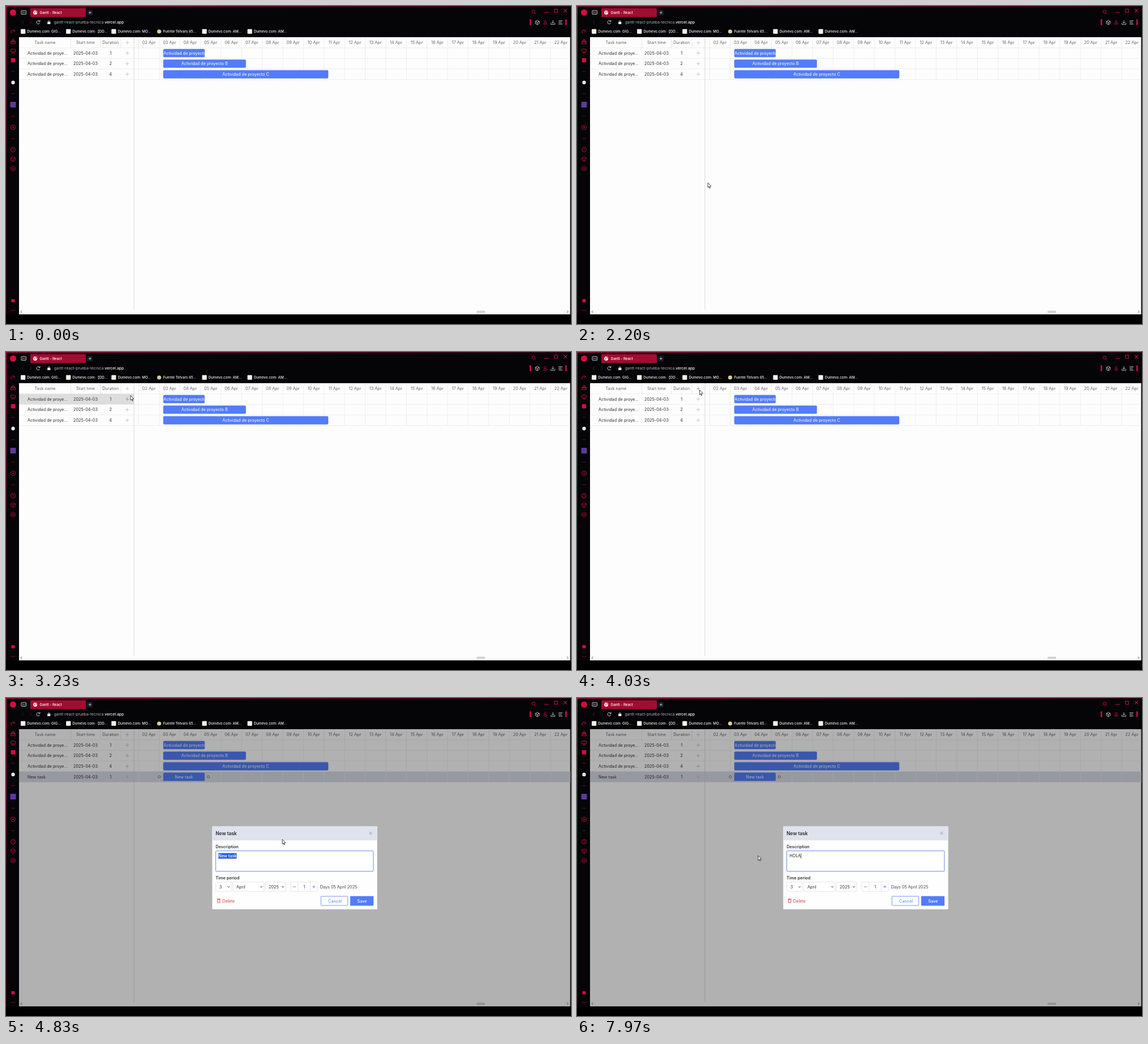
Recreate the animation shown at these times as an HTML page with a canvas. Size 998x561 px, loop 8 s.

```html
<!DOCTYPE html>
<html lang="es">
<head>
<meta charset="utf-8">
<title>Gantt</title>
<style>
  html, body { margin: 0; width: 100%; height: 100%; overflow: hidden; background: #000; }
  canvas { display: block; width: 998px; height: 561px; }
</style>
</head>
<body>
<canvas id="stage" width="998" height="561"></canvas>
<script>
const ctx = document.getElementById('stage').getContext('2d');
const FONT = 'Inter, "Noto Sans CJK JP", "Noto Sans CJK SC", sans-serif';
const LOOP = 8000, CLICK = 4050, DAY = 36.38, ROW = 18.65;
const RED = '#d20f3e', BLUE = '#537cfa', INK = '#303134';
const KEYS = [6600, 6950, 7250, 7500], TYPED = 'HOLA';

// Pointer path: time, x, y
const PATH = [
  [1900, 234, 522], [2250, 231, 300], [2580, 229, 108], [2670, 224.5, 88],
  [3050, 222, 82], [3500, 216.5, 67], [4300, 216.5, 67], [4850, 489, 250],
  [5170, 468, 256], [5800, 320, 278], [LOOP, 320, 278]
];

const rowY = i => 83.1 + i * ROW;

function rect(x, y, w, h, fill, r = 0, stroke, lw = 0.6) {
  ctx.beginPath();
  ctx.roundRect(x, y, w, h, r);
  if (fill) { ctx.fillStyle = fill; ctx.fill(); }
  if (stroke) { ctx.strokeStyle = stroke; ctx.lineWidth = lw; ctx.stroke(); }
}

function line(points, color, lw = 0.8) {
  ctx.beginPath();
  for (let i = 0; i < points.length; i += 2) ctx.lineTo(points[i], points[i + 1]);
  ctx.strokeStyle = color;
  ctx.lineWidth = lw;
  ctx.stroke();
}

function ring(x, y, r, color, lw = 0.9, from = 0, to = Math.PI * 2) {
  ctx.beginPath();
  ctx.arc(x, y, r, from, to);
  ctx.strokeStyle = color;
  ctx.lineWidth = lw;
  ctx.stroke();
}

function dot(x, y, r, color) {
  ctx.beginPath();
  ctx.arc(x, y, r, 0, Math.PI * 2);
  ctx.fillStyle = color;
  ctx.fill();
}

// y is the middle of the capitals; returns the right edge of left-aligned text
function text(str, x, y, color, size = 7.28, weight = 400, align = 'left') {
  ctx.font = `${weight} ${size}px ${FONT}`;
  ctx.textAlign = align;
  ctx.fillStyle = color;
  ctx.fillText(str, x, y + size * 0.36);
  return x + ctx.measureText(str).width;
}

const label = (str, x, y, color, weight) => text(str, x, y, color, 7.28, weight, 'center');

function plus(x, y, r, color, lw = 0.8) {
  line([x - r, y, x + r, y], color, lw);
  line([x, y - r, x, y + r], color, lw);
}

function chevron(x, y) {
  line([x - 2, y - 1, x, y + 1, x + 2, y - 1], '#333', 0.9);
}

function cube(x, y, r, color) {
  const w = r * 0.87, h = r / 2;
  line([x, y - r, x + w, y - h, x + w, y + h, x, y + r, x - w, y + h, x - w, y - h, x, y - r], color);
  line([x - w, y - h, x, y, x + w, y - h], color);
  line([x, y, x, y + r], color);
}

function fade(x, y, w, h, x2, y2) {
  const g = ctx.createLinearGradient(0, 0, x2, y2);
  g.addColorStop(0, '#c80f3a');
  g.addColorStop(1, '#3a0612');
  ctx.fillStyle = g;
  ctx.fillRect(x, y, w, h);
}

function drawSidebar() {
  const x = 12.5;
  ring(x, 46, 3.6, RED, 1, 2.4, 6);
  line([x, 46, x + 3, 43], RED, 1);
  line([x, 58, x, 61], RED, 1.2);
  rect(x - 3, 61, 6, 2, null, 0, RED, 0.9);
  rect(x - 4, 63.5, 8, 3, null, 0, RED, 0.9);
  rect(x - 4, 76, 8, 5, null, 1, RED, 0.9);
  line([x - 2.5, 83, x + 2.5, 83], RED, 0.9);
  rect(x - 3.8, 92, 7.6, 7.6, RED, 1);
  for (const y of [115.2, 154.6, 194.4, 234]) line([x - 3, y, x + 3, y], '#7d1230', 0.8);
  dot(x, 135, 3.2, '#e8e8ee');
  rect(x - 5, 169, 10, 10, '#5b3a9c', 1);
  ring(x, 214, 4, RED);
  dot(x, 214, 1.3, RED);
  ring(x, 253.5, 4, RED);
  line([x, 251, x, 253.7, x + 1.8, 254.7], RED);
  cube(x, 270, 4.3, RED);
  const hex = [];
  for (let i = 0; i <= 6; i++) {
    const a = i * Math.PI / 3 + Math.PI / 6;
    hex.push(x + 4.4 * Math.cos(a), 286.8 + 4.4 * Math.sin(a));
  }
  line(hex, RED);
  ring(x, 286.8, 1.6, RED);
  rect(x - 3, 517.2, 6, 5.4, RED);
  for (const d of [-2.8, 0, 2.8]) dot(x + d, 537, 0.75, RED);
}

function drawBrowser() {
  rect(0, 0, 998, 561, '#050508');
  rect(0, 544, 998, 17, '#000');
  fade(0, 0, 998, 1, 998, 0);
  fade(0, 0, 1, 544, 0, 300);
  dot(12.5, 11.5, 5.5, RED);

  rect(27, 8, 8.4, 6.6, null, 0.6, '#e4e4e8', 0.9);
  line([29, 10, 31, 11.4, 29, 12.8], '#e4e4e8');
  line([33.5, 10, 32.4, 11.4, 33.5, 12.8], '#e4e4e8');
  rect(43, 4, 98, 15.4, '#a10d31', 1.5);
  dot(51.6, 11.6, 3.6, '#fff');
  line([49, 10.2, 51.2, 11.3, 50.6, 13.8], '#a10d31', 1);
  line([52.5, 8.6, 53, 10.6, 54.8, 11.2], '#a10d31', 1);
  text('Gantt - React', 59.5, 11.7, '#fff', 6.24, 500);
  rect(143.5, 7, 9.5, 9.5, '#1b1b27', 1);
  plus(148.3, 11.7, 2.4, '#d8d8de');

  line([31, 25.6, 28, 28.5, 31, 31.4], '#55212f', 0.9);
  line([42.3, 25.6, 45.3, 28.5, 42.3, 31.4], '#55212f', 0.9);
  ring(57, 28.7, 3, '#e0e0e6', 0.9, 0.4, 5.5);
  line([60, 25, 60, 27.4, 57.6, 27.4], '#e0e0e6', 0.9);
  rect(73.2, 28, 5.2, 4, '#eee', 0.6);
  ring(75.8, 27.8, 1.6, '#eee', 0.9, Math.PI, 0);
  const host = text('gantt-react-prueba-tecnica.', 84.7, 28.8, '#b4b4bc', 6.76);
  text('vercel.app', host, 28.8, '#fff', 6.76, 500);

  ring(931.8, 9.8, 2.7, RED);
  line([933.8, 11.8, 936.4, 14.2], RED);
  line([950.5, 11.2, 959, 11.2], RED, 0.9);
  rect(968.7, 5.6, 5.6, 5.6, null, 0, RED, 1);
  line([985.2, 5.4, 991, 11.2], RED, 1.1);
  line([991, 5.4, 985.2, 11.2], RED, 1.1);

  rect(925, 23.5, 2.6, 10.2, RED);
  rect(988, 23.5, 2.4, 10.2, RED);
  cube(938.5, 29, 3.8, '#e4e4e8');
  ring(952.3, 27.2, 1.7, '#b00f36');
  rect(949.3, 30, 6, 2.2, null, 0.8, '#b00f36', 0.9);
  line([966, 25.2, 966, 30.3], '#e4e4e8');
  line([963.8, 28.2, 966, 30.4, 968.2, 28.2], '#e4e4e8');
  line([962.5, 30, 962.5, 32.4, 969.5, 32.4, 969.5, 30], '#e4e4e8');
  [0, 2.8, 5.6].forEach((d, i) =>
    line([976, 26.2 + d, 983 - (i === 1 ? 1.5 : 0), 26.2 + d], '#e4e4e8', 0.9));

  const marks = ['Dumevo.com: GIG...', 'Dumevo.com:【DD...', 'Dumevo.com: MO...',
    'Fuente Telvars 65...', 'Dumevo.com: AM...', 'Dumevo.com: AM...'];
  marks.forEach((name, i) => {
    const x = 26 + i * 80.1;
    if (i === 3) dot(x + 4.2, 45, 3.6, '#dccb9a');
    else rect(x, 40.8, 8.2, 8.2, '#f4f1e8', 1);
    text(name, x + 11.2, 45, '#f2f2f4', 6.24, 500);
  });
  drawSidebar();
}

function drawBar(i, days, name) {
  const y = rowY(i) - 7, w = days * DAY;
  rect(278, y, w, 14, BLUE, 1.6, '#4a70e6', 0.5);
  ctx.save();
  ctx.beginPath();
  ctx.rect(278, y, w, 14);
  ctx.clip();
  if (i === 0) text(name, 278.3, rowY(i), '#fff');
  else label(name, 278 + w / 2, rowY(i), '#fff');
  ctx.restore();
}

function drawGantt(open, pointer) {
  const rows = open ? 4 : 3, bottom = rowY(rows - 1) + ROW / 2;
  rect(23, 55, 973.5, 489, '#fdfdfd');
  const inGrid = pointer && pointer.x < 226;
  const hover = inGrid && !open ? Math.floor((pointer.y - 73.8) / ROW) : -9;
  if (hover >= 0 && hover < 3) rect(23, rowY(hover) - ROW / 2, 203, ROW, '#dddddd');
  if (open) rect(23, rowY(3) - ROW / 2, 973.5, ROW, '#d7dbe4');

  ctx.save();
  ctx.beginPath();
  ctx.rect(226, 55, 770.5, 481);
  ctx.clip();
  for (let d = 1; d <= 22; d++) {
    const x = 252.5 + (d - 2) * DAY;
    line([x + DAY / 2, 55, x + DAY / 2, bottom], '#ebebee', 0.8);
    label(String(d).padStart(2, '0') + ' Apr', x, 64.6, '#66676a');
  }
  ctx.restore();

  for (let i = 0; i <= rows; i++) {
    const y = rowY(i) - ROW / 2;
    line([23, y, 996.5, y], '#e8e8ea', 0.7);
  }
  for (const x of [114.5, 166.5, 203]) line([x, 55, x, 73.8], '#e2e2e5', 0.8);
  line([226, 55, 226, 536], '#d3d3d8', 0.9);

  label('Task name', 69, 64.6, '#66676a');
  label('Start time', 140.5, 64.6, '#66676a');
  label('Duration', 184.7, 64.6, '#66676a');
  const onHeader = inGrid && !open && pointer.y < 73.8;
  plus(214.2, 64.6, 3.2, onHeader ? '#8c8c90' : '#bcbcc0');

  const days = [1, 2, 4, 1];
  for (let i = 0; i < rows; i++) {
    const y = rowY(i);
    text(i < 3 ? 'Actividad de proye...' : 'New task', 38, y, INK);
    label('2025-04-03', 140.5, y, INK);
    label(String(days[i]), 184.7, y, INK);
    plus(214.2, y, 3.2, hover === i ? '#8c8c90' : '#bcbcc0');
    drawBar(i, days[i] * 2, i < 3 ? 'Actividad de proyecto ' + 'ABC'[i] : 'New task');
  }
  if (open) {
    ring(271, rowY(3), 2.1, '#77787c', 1);
    ring(357.4, rowY(3), 2.1, '#77787c', 1);
    line([276.5, 146.6, 278.5, 144.6, 280, 146.6], '#8a8c92', 0.8);
  }

  line([28.2, 537.3, 26.2, 539.4, 28.2, 541.5], '#444', 0.9);
  line([991, 537.3, 993, 539.4, 991, 541.5], '#444', 0.9);
  rect(831, 537.6, 15.5, 3.8, '#d2d2d6', 1.9);
}

function drawField(t) {
  rect(370.5, 269.7, 278.4, 36, '#fff', 1, '#5b7fd6', 0.9);
  const count = KEYS.filter(k => t >= k).length;
  if (!count) {
    rect(375, 273.4, 32.4, 10, '#2a63d8');
    text('New task', 375.2, 278.7, '#fff', 7.28, 500);
    line([394, 283, 407, 283], '#d2556e', 0.7);
    return;
  }
  const end = text(TYPED.slice(0, count), 375.2, 278.7, '#1f1f22');
  if ((t - KEYS[count - 1]) % 1000 < 500) line([end + 0.5, 274, end + 0.5, 283], '#111', 0.7);
}

function drawModal(t) {
  rect(23, 55, 973.5, 489, 'rgba(0,0,0,0.3)');
  rect(364.3, 226.5, 291.4, 146.2, '#fefefe', 1);
  rect(364.3, 226.5, 291.4, 24.8, '#dfe3ee', [1, 1, 0, 0]);
  text('New task', 370.3, 238.8, '#26272a', 8.3, 600);
  line([641.7, 236.1, 646.5, 240.9], '#8a8c92', 0.9);
  line([646.5, 236.1, 641.7, 240.9], '#8a8c92', 0.9);

  text('Description', 370.3, 262.5, INK, 7.28, 600);
  drawField(t);

  text('Time period', 370.3, 317.6, INK, 7.28, 600);
  const selects = [[370.5, 27.5, '3', 376.8], [400.5, 55.3, 'April', 407], [458, 36, '2025', 464]];
  for (const [x, w, str, tx] of selects) {
    rect(x, 324.7, w, 16.5, '#fff', 1, '#dcdde0', 0.7);
    text(str, tx, 333.2, INK);
    chevron(x + w - 4.8, 333.2);
  }
  rect(503, 324.7, 47, 16.5, '#fff', 1, '#dcdde0', 0.7);
  line([516, 324.7, 516, 341.2], '#dcdde0', 0.7);
  line([537.5, 324.7, 537.5, 341.2], '#dcdde0', 0.7);
  line([507, 333, 512, 333], BLUE, 0.9);
  plus(543.8, 333, 2.5, BLUE, 0.9);
  label('1', 526.7, 333.2, INK);
  text('Days 05 April 2025', 554.7, 333.2, '#46474b');

  const warn = '#cf3d3f';
  rect(373.5, 355.6, 4.4, 5.6, null, 0.6, warn, 0.9);
  line([372.6, 354.6, 378.8, 354.6], warn, 0.9);
  text('Delete', 382, 358, warn);
  rect(556.3, 349.8, 47.3, 16.2, '#fff', 1.2, BLUE, 0.8);
  label('Cancel', 581, 358, BLUE);
  rect(608, 349.4, 41.2, 17, BLUE, 1.2);
  label('Save', 629, 358, '#fff', 500);
}

function pointerAt(t) {
  if (t < PATH[0][0]) return null;
  const i = PATH.findIndex(p => p[0] > t);
  const [t0, x0, y0] = PATH[i - 1], [t1, x1, y1] = PATH[i];
  const u = (t - t0) / (t1 - t0), e = u * u * (3 - 2 * u);
  return { x: x0 + (x1 - x0) * e, y: y0 + (y1 - y0) * e };
}

function drawPointer({ x, y }) {
  ctx.save();
  ctx.translate(x, y);
  ctx.beginPath();
  for (const [a, b] of [[0, 0], [0, 8.4], [1.9, 6.7], [3.1, 9.6], [4.4, 9], [3.2, 6.2], [5.8, 6]]) ctx.lineTo(a, b);
  ctx.closePath();
  ctx.fillStyle = '#fff';
  ctx.fill();
  ctx.strokeStyle = '#15151a';
  ctx.lineWidth = 0.8;
  ctx.stroke();
  ctx.restore();
}

function frame(now) {
  const t = now % LOOP, open = t >= CLICK, pointer = pointerAt(t);
  drawBrowser();
  drawGantt(open, pointer);
  if (open) drawModal(t);
  if (pointer) drawPointer(pointer);
}

const start = performance.now();
function tick() {
  frame(performance.now() - start);
  requestAnimationFrame(tick);
}
tick();
</script>
</body>
</html>
```
